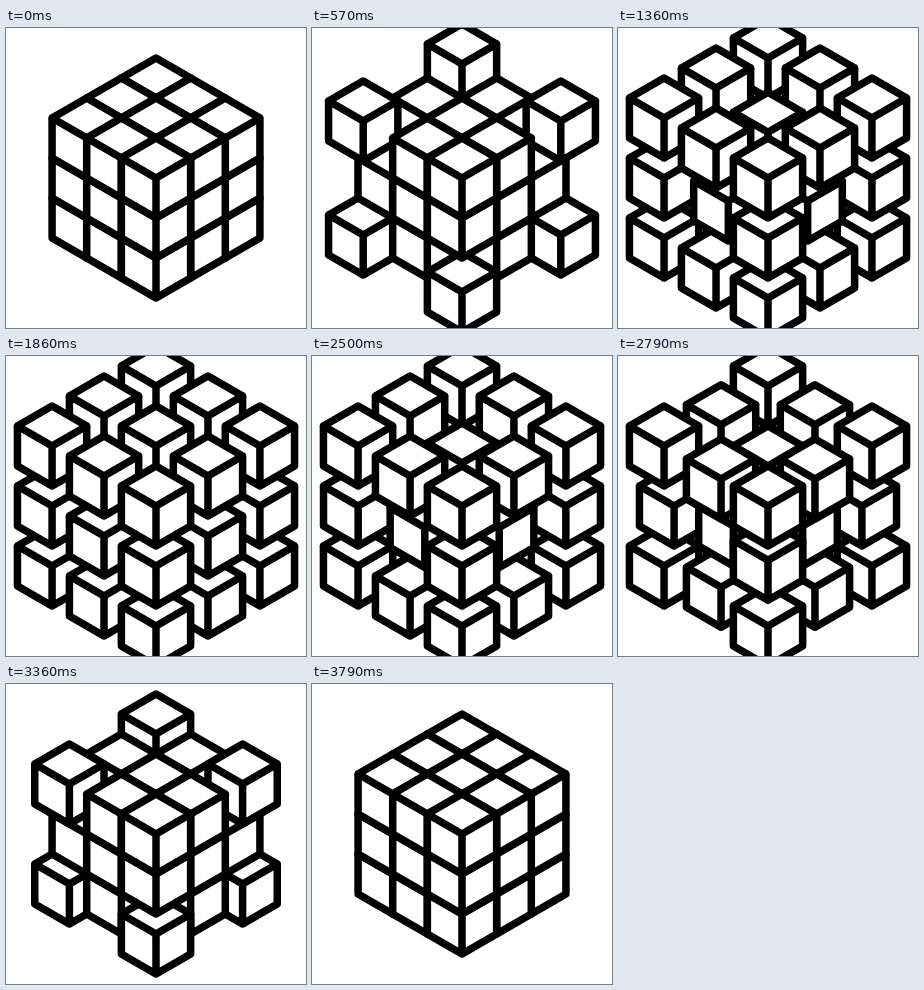
Animation of 300 by 300 pixels, one loop 3.87 s. Source, as an HTML page with a canvas:

```html
<!DOCTYPE html>
<html lang="en">
<head>
<meta charset="utf-8">
<title>Exploding cube</title>
<style>
  html, body { margin: 0; width: 100%; height: 100%; overflow: hidden; background: #fff; }
  canvas { display: block; width: 300px; height: 300px; }
</style>
</head>
<body>
<canvas id="stage"></canvas>
<script>
const LOOP = 3870, FPS = 14, LAST = 53;
const EDGE = 40, HALF = EDGE * Math.sqrt(3) / 2;
const SPREAD = 0.5;            // outward travel, in cube edges
const MOVE = 12, STAGGER = 7;  // length of a move and delay between groups, in steps

const canvas = document.getElementById('stage');
const ctx = canvas.getContext('2d');
const ratio = window.devicePixelRatio || 1;
canvas.width = canvas.height = 300 * ratio;
ctx.scale(ratio, ratio);
ctx.lineWidth = 7.5;
ctx.lineJoin = ctx.lineCap = 'round';
ctx.strokeStyle = '#000';
ctx.fillStyle = '#fff';

// x runs to the lower left, y to the lower right, z up.
const cubes = [];
for (const x of [-1, 0, 1])
  for (const y of [-1, 0, 1])
    for (const z of [-1, 0, 1])
      cubes.push({ x, y, z, axes: Math.abs(x) + Math.abs(y) + Math.abs(z) });
cubes.sort((a, b) => (a.x + a.y + a.z) - (b.x + b.y + b.z));

function ease(p) {
  p = Math.min(1, Math.max(0, p));
  return p < 0.5 ? 4 * p ** 3 : 1 - 4 * (1 - p) ** 3;
}

// (cx, cy) is the near top corner, which is the middle of the hexagon.
function drawCube(cx, cy) {
  const left = cx - HALF, right = cx + HALF, h = EDGE / 2;
  ctx.beginPath();
  ctx.moveTo(cx, cy - EDGE);
  ctx.lineTo(right, cy - h);
  ctx.lineTo(right, cy + h);
  ctx.lineTo(cx, cy + EDGE);
  ctx.lineTo(left, cy + h);
  ctx.lineTo(left, cy - h);
  ctx.closePath();
  ctx.fill();
  ctx.moveTo(left, cy - h);
  ctx.lineTo(cx, cy);
  ctx.lineTo(right, cy - h);
  ctx.moveTo(cx, cy);
  ctx.lineTo(cx, cy + EDGE);
  ctx.stroke();
}

function draw(time) {
  const step = Math.min(LAST, Math.floor((time + 5) * FPS / 1000));
  const pos = Math.min(step, LAST - step);  // out, then back the same way
  ctx.clearRect(0, 0, 300, 300);
  for (const { x, y, z, axes } of cubes) {
    // corners leave first, then edges, then face centres
    const k = 1 + SPREAD * ease((pos - STAGGER * (3 - axes)) / MOVE);
    drawCube(150 + (y - x) * k * HALF, 150 + ((x + y) / 2 - z) * k * EDGE);
  }
}

const start = performance.now();
function tick() {
  draw((performance.now() - start) % LOOP);
  requestAnimationFrame(tick);
}
tick();
</script>
</body>
</html>
```
